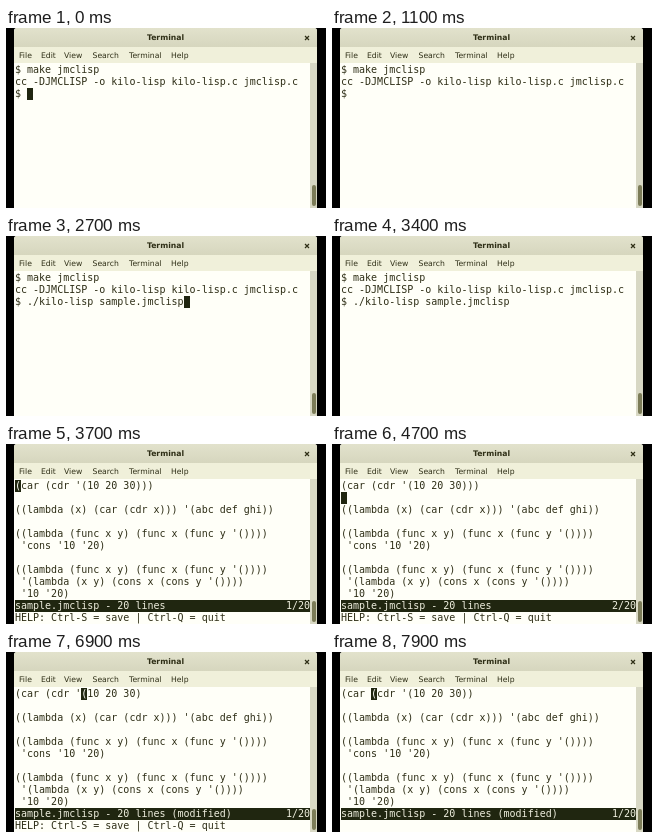
Animation of 320 by 180 pixels, one loop 8 s. Source, as an HTML page:

```html
<!DOCTYPE html>
<html lang="en">
<head>
<meta charset="utf-8">
<title>Terminal</title>
<style>
  :root { --ink: #2e2e16; --bar: #202610; --paper: #fffff8; --chrome: #f0f0da; }
  html, body { margin: 0; width: 100%; height: 100%; overflow: hidden; background: #000; }
  #stage { position: relative; width: 320px; height: 180px; overflow: hidden; background: #000; }
  #stage div, #stage span { position: absolute; white-space: pre; }
  #window { left: 8px; top: 0; width: 303px; height: 180px; overflow: hidden;
    background: var(--paper); color: var(--ink); border-radius: 3px 3px 0 0;
    font: 7.7px/18px "DejaVu Sans", sans-serif; }
  #title { left: 0; top: 0; width: 303px; height: 19px; text-align: center;
    background: linear-gradient(#e2e2cc, #d6d6be); font-weight: bold; line-height: 19px; }
  #title svg { position: absolute; left: 290px; top: 7px; }
  #menu { left: 0; top: 19px; width: 303px; height: 16px; background: var(--chrome); }
  #track { left: 296px; top: 35px; width: 7px; height: 145px; background: #d8d8c4; }
  #thumb { left: 297.5px; top: 157px; width: 4px; height: 21px; border-radius: 2px; background: #7c7c58; }
  #screen { left: 1px; top: 36px; width: 295px; height: 144px;
    font: 10px/12px "DejaVu Sans Mono", monospace; }
  #screen div { left: 0; height: 12px; }
  #screen .inverse { width: 295px; background: var(--bar); color: #eeeede; }
  #screen #cursor { width: 1ch; background: var(--bar); color: var(--paper); }
</style>
</head>
<body>
<div id="stage">
  <div id="window">
    <div id="title">Terminal<svg width="6" height="6" viewBox="0 0 6 6"><path d="M1 1L5 5M5 1L1 5" stroke="#2e2e16" stroke-width="1.2"/></svg></div>
    <div id="menu"></div>
    <div id="screen"></div>
    <div id="track"></div>
    <div id="thumb"></div>
  </div>
</div>
<script>
const LOOP = 8000, BLINK = 600, COLS = 49, ROWS = 12, HELP_END = 7600;

const shell = ['$ make jmclisp', 'cc -DJMCLISP -o kilo-lisp kilo-lisp.c jmclisp.c'];
const source = [
  '',
  "((lambda (x) (car (cdr x))) '(abc def ghi))",
  '',
  "((lambda (func x y) (func x (func y '())))",
  " 'cons '10 '20)",
  '',
  "((lambda (func x y) (func x (func y '())))",
  " '(lambda (x y) (cons x (cons y '())))",
  " '10 '20)"
];
const help = 'HELP: Ctrl-S = save | Ctrl-Q = quit';

// Shell history recall: [time, command]
const commands = [[100, ''], [1900, 'make jmclisp'], [2100, 'make clean'], [2300, './kilo-lisp sample.jmclisp']];

// Editor: [time, closing parens, cursor row, cursor column]
const edits = [
  [3500, 3, 0, 0],
  [4300, 3, 1, 0],
  [4900, 3, 0, 23],
  [5400, 2, 0, 22],
  [5700, 1, 0, 21],
  [6100, 0, 0, 20],
  [6700, 1, 0, 11],   // jump to the matching paren
  [7200, 1, 0, 21],
  [7600, 2, 0, 5]
];

const screen = document.getElementById('screen');
const add = (parent, tag) => parent.appendChild(document.createElement(tag));
const rows = Array.from({ length: ROWS }, (_, i) => {
  const row = add(screen, 'div');
  row.style.top = i * 12 + 'px';
  return row;
});
const cursor = add(screen, 'div');
cursor.id = 'cursor';

const menu = document.getElementById('menu');
[['File', 5], ['Edit', 27], ['View', 50], ['Search', 78.5], ['Terminal', 115], ['Help', 157]].forEach(([label, x]) => {
  const item = add(menu, 'span');
  item.textContent = label;
  item.style.left = x + 'px';
});

const at = (steps, t) => steps.filter(s => s[0] <= t).pop() || steps[0];

function shellState(t) {
  const [since, text] = at(commands, t);
  return { since, lines: [...shell, '$ ' + text], row: 2, col: 2 + text.length };
}

function editorState(t) {
  const [since, parens, row, col] = at(edits, t);
  const name = 'sample.jmclisp - 20 lines' + (parens < 3 ? ' (modified)' : '');
  const place = row + 1 + '/20';
  const status = name + place.padStart(COLS - name.length);
  const first = "(car (cdr '(10 20 30" + ')'.repeat(parens);
  return { since, row, col, lines: [first, ...source, status, t < HELP_END ? help : ''] };
}

let shown = '';
function draw(t) {
  const editing = t >= edits[0][0];
  const { since, lines, row, col } = editing ? editorState(t) : shellState(t);
  const lit = t < since || Math.floor((t - since) / BLINK) % 2 === 0;
  const key = [lines.join('\n'), row, col, lit].join();
  if (key === shown) return;
  shown = key;
  rows.forEach((el, i) => {
    el.textContent = lines[i] || '';
    el.className = editing && i === ROWS - 2 ? 'inverse' : '';
  });
  cursor.textContent = lines[row][col] || ' ';
  cursor.style.left = col + 'ch';
  cursor.style.top = row * 12 + 'px';
  cursor.style.visibility = lit ? 'visible' : 'hidden';
}

const start = performance.now();
function tick() {
  draw((performance.now() - start) % LOOP);
  requestAnimationFrame(tick);
}
tick();
</script>
</body>
</html>
```
